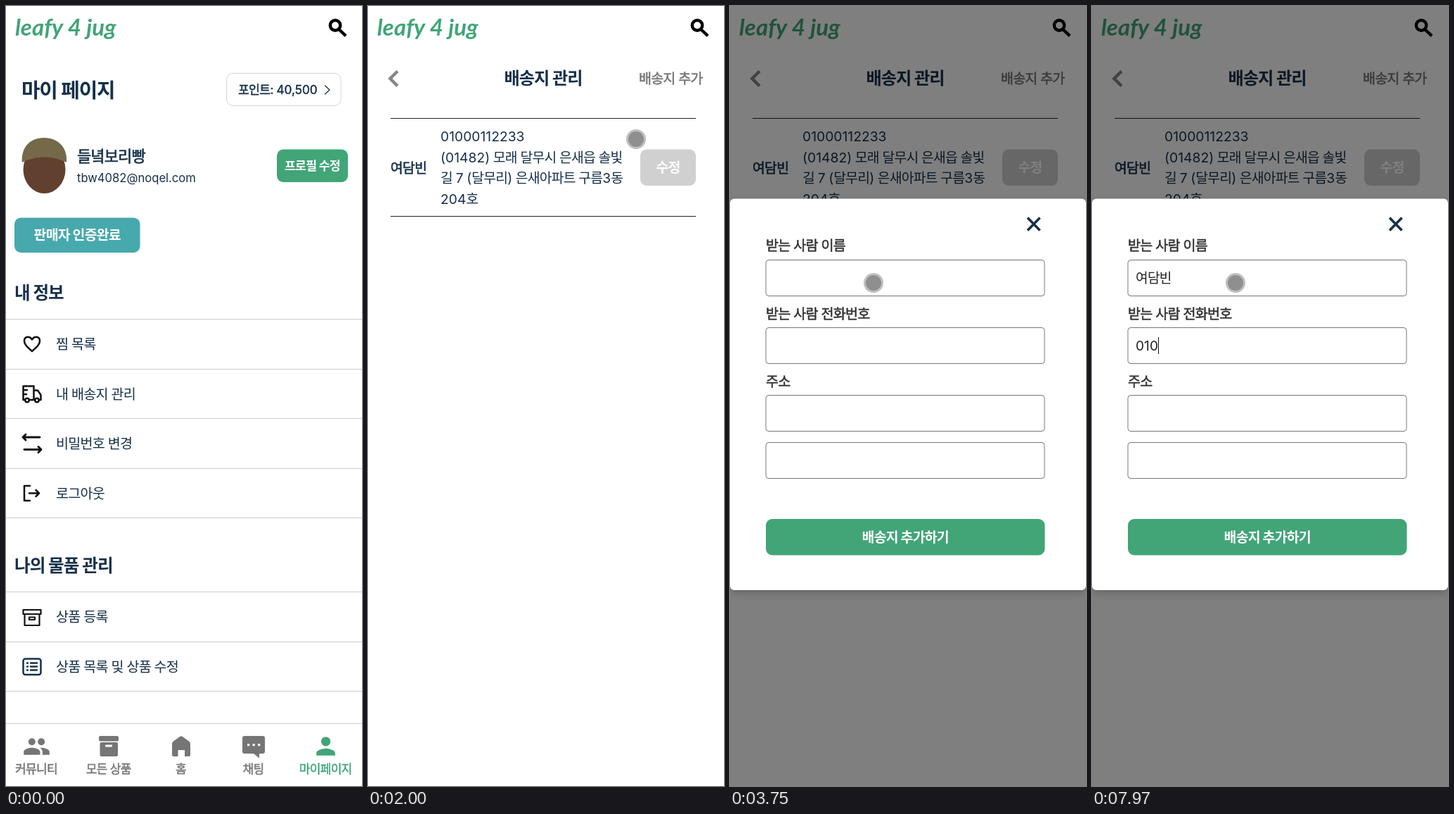
Animation of 506x1107 px, one loop 8000 ms. Source, as an HTML page:

```html
<!DOCTYPE html>
<html lang="ko">
<head>
<meta charset="utf-8">
<title>My page</title>
<style>
  html, body { margin: 0; width: 100%; height: 100%; overflow: hidden; background: #fff; }
  svg { display: block; width: 506px; height: 1107px; font-family: Inter, "Noto Sans CJK KR", "Noto Sans CJK", sans-serif; }
  .ko { letter-spacing: -.04em; }
  .icon { fill: none; stroke: #111; stroke-width: 2.5; stroke-linejoin: round; stroke-linecap: round; }
</style>
</head>
<body>
<svg id="stage" viewBox="0 0 506 1107" xml:space="preserve"></svg>
<script>
const LOOP = 8000, STEP = 1000 / 15;
const NAVY = '#17304a', GREEN = '#41a578', GREY = '#757575';

// Hangul is set a little tighter than Latin text.
const tighten = s => s.replace(/[ㄱ-ㅎ가-힣 ]+/g, m => `<tspan class="ko">${m}</tspan>`);

// Text is placed by its vertical centre; medium weight is regular with a thin outline.
const text = (x, cy, size, str, { fill = NAVY, weight = 400, medium = false, anchor = 'start', id = '' } = {}) =>
  `<text ${id && `id="${id}"`} x="${x}" y="${cy + size * .37}" font-size="${size}" fill="${fill}"
    font-weight="${weight}" text-anchor="${anchor}"
    ${medium ? `stroke="${fill}" stroke-width="${size * .028}"` : ''}>${tighten(str)}</text>`;
const rect = (x, y, w, h, r, fill, extra = '') =>
  `<rect x="${x}" y="${y}" width="${w}" height="${h}" rx="${r}" fill="${fill}" ${extra}/>`;
const rule = (y, x1 = 0, x2 = 506, color = '#cdcdcd') =>
  `<path d="M${x1} ${y}H${x2}" stroke="${color}"/>`;
const icon = (d, style = '') => `<path class="icon" d="${d}" style="${style}"/>`;
const solid = (d, fill = GREY, extra = '') => `<path d="${d}" fill="${fill}" ${extra}/>`;
const button = (x, y, w, h, fill, label, size) =>
  rect(x, y, w, h, 9, fill) +
  text(x + w / 2, y + h / 2, size, label, { fill: '#fff', weight: 700, anchor: 'middle' });

const header =
  `<text x="13" y="42" font-family="Lato, sans-serif" font-size="33" font-style="italic" font-weight="700" fill="${GREEN}">leafy 4 jug</text>` +
  `<g fill="none" stroke="#000" stroke-width="4.4"><circle cx="468" cy="27.5" r="7.2"/><path d="M473 33L483 42.3"/></g>`;

const avatar =
  `<ellipse cx="54.5" cy="232" rx="30" ry="34" fill="#61402f"/>` +
  solid('M23 222C21 201 34 187 54 187S88 201 86 222C66 212 43 212 23 222Z', '#75694a');

const menuItem = (cy, label) => text(71, cy, 19.6, label);

const menuIcons =
  icon('M37 490C29 483 26 480 26 475.500C26 468.500 34 468 37 473.500C40 468 48 468.500 48 475.500C48 480 45 483 37 490Z') +
  icon('M27 559H24.500V539.500H39.500V559H33M39.500 545.500H45L49.500 552V559H47M41 559H39.500M25 545H30M25 551H29') +
  `<g class="icon"><circle cx="30" cy="559.5" r="2.7"/><circle cx="44" cy="559.5" r="2.7"/></g>` +
  icon('M48 612H24M28 608L24 612L28 616M26 629.500H50M46 625.500L50 629.500L46 633.500', 'stroke-width:2.9') +
  icon('M34 681H26V702H34M33 691.500H47M42.500 687L47 691.500L42.500 696') +
  icon('M24.500 857H49.500V863H24.500ZM26.500 863V879H47.500V863M33 867.500H41V871H33Z', 'stroke-width:2.2') +
  `<g class="icon" style="stroke:${NAVY}">${rect(24.5, 926.5, 25, 22.5, 3, 'none')}
    <path d="M30 932.500H31M30 937.500H31M30 942.500H31M35 932.500H44M35 937.500H44M35 942.500H44" stroke-width="2.4"/></g>`;

const tabIcons =
  solid('M16 11a3 3 0 1 0 0-6 3 3 0 0 0 0 6zM8 11a3 3 0 1 0 0-6 3 3 0 0 0 0 6zm0 2c-2.330 0-7 1.170-7 3.500V19h14v-2.500c0-2.330-4.670-3.500-7-3.500zm8 0l-1 .05c1.160.840 2 1.970 2 3.450V19h6v-2.500c0-2.330-4.670-3.500-7-3.500z',
    GREY, 'transform="translate(23.5 1031) scale(1.667)"') +
  rect(132, 1036, 28, 7.5, 2, GREY) + rect(133.5, 1045, 25.5, 20, 2, GREY) + rect(141, 1048.5, 10, 3, 1, '#fff') +
  solid('M236 1047Q236 1045 238 1043.500L247 1037Q249 1035.500 251 1037L260 1043.500Q262 1045 262 1047V1063Q262 1065 260 1065H254V1056H244.500V1065H238Q236 1065 236 1063Z') +
  solid('M339 1036H365Q368 1036 368 1039V1058Q368 1061 365 1061H360V1067.500L352 1061H339Q336 1061 336 1058V1039Q336 1036 339 1036Z') +
  [343, 350.5, 358].map(x => rect(x, 1047, 3.2, 3.2, 0, '#fff')).join('') +
  solid('M12 12a4 4 0 1 0 0-8 4 4 0 0 0 0 8zm0 2c-2.670 0-8 1.340-8 4v2h16v-2c0-2.660-5.330-4-8-4z',
    GREEN, 'transform="translate(434.5 1030.5) scale(1.667)"');

const tabs = ['커뮤니티', '모든 상품', '홈', '채팅', '마이페이지'].map((label, i) =>
  text(43 + i * 102.8, 1083, 17, label, { fill: i < 4 ? GREY : GREEN, medium: true, anchor: 'middle' })).join('');

const myPage =
  text(22, 119, 28.8, '마이 페이지', { weight: 700 }) +
  rect(313.5, 95.5, 162.5, 46, 9, '#fff', 'stroke="#d2d5d9"') +
  text(330, 119, 17.2, '포인트: 40,500', { medium: true }) +
  icon('M453.500 113L460 119L453.500 125', `stroke:${NAVY};stroke-width:1.3`) +
  avatar +
  text(101, 213, 22, '들녘보리빵', { medium: true }) +
  text(101, 244, 16.6, 'tbw4082@noqel.com') +
  button(385, 203.5, 101, 46.5, GREEN, '프로필 수정', 17.2) +
  button(12, 300.5, 178.5, 49.5, '#47a9ad', '판매자 인증완료', 19.4) +
  text(12, 406.5, 24.6, '내 정보', { weight: 700 }) +
  text(12, 793.5, 24.6, '나의 물품 관리', { weight: 700 }) +
  [444.5, 515.5, 585.5, 656.5, 726.5, 831.5, 902.5, 972.5, 1018.5].map(y => rule(y)).join('') +
  menuItem(480, '찜 목록') + menuItem(550.5, '내 배송지 관리') +
  menuItem(621, '비밀번호 변경') + menuItem(691.5, '로그아웃') +
  menuItem(867, '상품 등록') + menuItem(937.5, '상품 목록 및 상품 수정') +
  menuIcons + tabIcons + tabs;

const addressLines = ['01000112233', '(01482) 모래 달무시 은새읍 솔빛', '길 7 (달무리) 은새아파트 구름3동', '204호'];
const addressPage =
  icon('M42 92.500L31.500 103L42 113.500', 'stroke:#858585;stroke-width:4.5;stroke-linecap:butt;stroke-linejoin:miter') +
  text(249, 102.5, 24.2, '배송지 관리', { weight: 700, anchor: 'middle' }) +
  text(385, 102.5, 19.5, '배송지 추가', { fill: GREY, medium: true }) +
  rule(159.5, 32, 466, '#222') + rule(298.5, 32, 466, '#222') +
  text(32, 229.5, 19.4, '여담빈', { medium: true }) +
  addressLines.map((line, i) => text(103, 185 + i * 29.6, 19.3, line)).join('') +
  button(387, 203.5, 79, 51.5, '#d0d0d0', '수정', 19.4);

const label = (cy, str) => text(51, cy, 19.6, str, { fill: '#333', medium: true });
const dialog =
  rect(0, 0, 506, 1107, 0, '#000', 'opacity=".5"') +
  rect(0, 273.5, 506, 555.5, 6, '#fff', 'style="filter:drop-shadow(0 4px 6px rgba(0,0,0,.2))"') +
  icon('M423 300.500L440.500 318.500M440.500 300.500L423 318.500', `stroke:${NAVY};stroke-width:3.6;stroke-linecap:butt`) +
  label(340, '받는 사람 이름') + label(436.5, '받는 사람 전화번호') + label(532.5, '주소') +
  [360.5, 456.5, 552.5, 619.5].map(y => rect(51, y, 396, 51, 4, '#fff', 'stroke="#767676"')).join('') +
  button(51, 728, 396.5, 51.5, GREEN, '배송지 추가하기', 19.4) +
  text(62, 385.5, 19.2, '', { id: 'name', fill: '#222' }) +
  text(62, 482, 19.2, '', { id: 'phone', fill: '#222' }) +
  rect(62, 397, 16, 1, 0, '#111', 'id="underline"') +
  rect(62, 374, 1, 24, 0, '#111', 'id="caret"');

document.getElementById('stage').innerHTML =
  rect(0, 0, 506, 1107, 0, '#fff') + header +
  `<g id="myPage">${myPage}</g><g id="addressPage">${addressPage}</g><g id="dialog">${dialog}</g>
   <g id="pointer"><circle id="halo" r="14"/><circle id="core" r="11"/></g>`;

const $ = id => document.getElementById(id);
const show = (id, on) => $(id).setAttribute('display', on ? 'inline' : 'none');
const set = (id, attrs) => Object.entries(attrs).forEach(([k, v]) => $(id).setAttribute(k, v));

// Pointer way points: time, x, y.
const route = [
  [267, 300, 971], [333, 140, 765], [400, 99, 705], [467, 107, 653], [600, 121, 590], [733, 130, 549],
  [1600, 131, 549], [1733, 201, 495], [1800, 316, 355], [1867, 343, 285], [2000, 381, 189],
  [2200, 409, 138], [2400, 423, 111], [2467, 430, 100], [3333, 431, 101],
  [3467, 350, 235], [3600, 240, 400], [3667, 212, 396], [3733, 204, 393]
];
const presses = [[1120, 1250], [2540, 2870], [3810, 3880]];

const nameKeys = [[3880, ''], [4150, 'ㅇ'], [4880, '애'], [5020, '액'], [5480, '애'], [5620, 'ㅇ'], [5760, ''],
  [6090, 'ㅇ'], [6160, '여'], [6230, '엳'], [6290, '여다'], [6360, '여담'],
  [6560, '여담ㅂ'], [6630, '여담비'], [6690, '여담빈']];
const phoneKeys = [[7230, ''], [7770, '0'], [7830, '01'], [7970, '010']];

const latest = (keys, t) => keys.filter(k => k[0] <= t).pop();

function pointAt(t) {
  const next = route.findIndex(p => p[0] > t);
  if (next < 0) return route[route.length - 1].slice(1);
  if (next === 0) return route[0].slice(1);
  const [t0, x0, y0] = route[next - 1], [t1, x1, y1] = route[next];
  const k = (t - t0) / (t1 - t0);
  return [x0 + (x1 - x0) * k, y0 + (y1 - y0) * k];
}

function drawPointer(t) {
  // The pointer moves in steps of a fifteenth of a second.
  const [x, y] = pointAt(Math.floor((t + 20) / STEP) * STEP);
  const pressed = presses.some(([from, to]) => t >= from && t < to);
  show('pointer', t >= 260);
  set('pointer', { transform: `translate(${x} ${y})` });
  set('halo', { fill: pressed ? '#d8d300' : '#000', opacity: pressed ? .72 : .25 });
  set('core', { fill: '#000', opacity: pressed ? .12 : .25 });
}

function drawTyping(t) {
  const name = latest(nameKeys, t), phone = latest(phoneKeys, t);
  $('name').innerHTML = tighten(name ? name[1] : '');
  $('phone').innerHTML = tighten(phone ? phone[1] : '');

  const active = phone || name;
  const end = active && active[1] ? 62 + $(phone ? 'phone' : 'name').getComputedTextLength() : 62;
  show('caret', active && t - active[0] < 400);
  set('caret', { x: Math.floor(end), y: phone ? 470 : 374 });
  show('underline', !phone && name && name[1]);
  set('underline', { x: Math.round(end) - 17 });
}

function draw(t) {
  show('myPage', t < 1250);
  show('addressPage', t >= 1250);
  show('dialog', t >= 2870);
  if (t >= 2870) drawTyping(t);
  drawPointer(t);
}

const start = performance.now();
function tick() {
  draw((performance.now() - start) % LOOP);
  requestAnimationFrame(tick);
}
tick();
</script>
</body>
</html>
```
